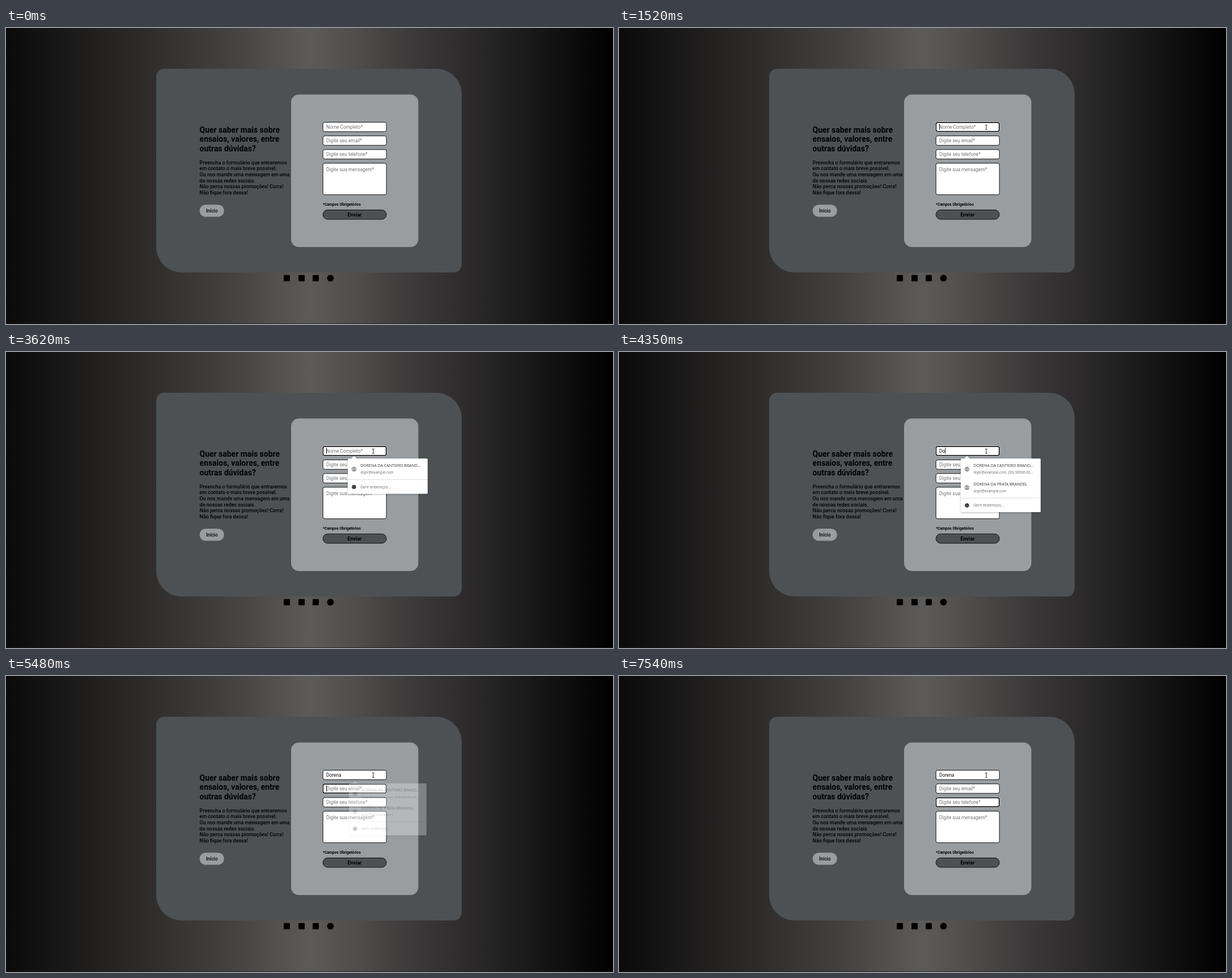
Animation of 1071 by 523 pixels, one loop 8000 ms. Source, as an HTML page:

```html
<!DOCTYPE html>
<html lang="pt">
<head>
<meta charset="utf-8">
<style>
  html, body { margin: 0; width: 100%; height: 100%; overflow: hidden; background: #000; }
  svg { display: block; width: 100vw; height: 100vh; font-family: Roboto, sans-serif; }
  h1 { margin: 0; }
  .heading { font-size: 13.95px; font-weight: 700; }
  .body { font-size: 8.93px; font-weight: 500; }
  .hint { font-size: 8.37px; fill: #757575; }
  .typed { font-size: 8.37px; fill: #111; }
  .field { fill: #fff; stroke: #111; stroke-width: 1; }
  .popup { font-family: "Open Sans", "Noto Sans", sans-serif; fill: #666; font-size: 6.2px; }
  .popup .name { font-size: 7px; fill: #333; }
  .popup .manage { font-size: 6.5px; }
</style>
</head>
<body>
<svg viewBox="0 0 1071 523" preserveAspectRatio="none">
  <defs>
    <linearGradient id="backdrop">
      <stop offset="0" stop-color="#0a0a0a"/>
      <stop offset=".23" stop-color="#2e2c2b"/>
      <stop offset=".38" stop-color="#464343"/>
      <stop offset=".43" stop-color="#504d4a"/>
      <stop offset=".5" stop-color="#5d5b57"/>
      <stop offset=".57" stop-color="#514e4c"/>
      <stop offset=".62" stop-color="#464343"/>
      <stop offset=".7" stop-color="#373435"/>
      <stop offset=".79" stop-color="#272626"/>
      <stop offset="1" stop-color="#000"/>
    </linearGradient>
    <filter id="shadow" x="-10%" y="-10%" width="120%" height="125%">
      <feDropShadow dx="0" dy="1" stdDeviation="1.5" flood-opacity=".3"/>
    </filter>
    <g id="person" fill="none" stroke="#444" stroke-width=".9">
      <circle r="3.6"/>
      <circle cy="-.9" r="1.2"/>
      <path d="M-2.4 2.5Q0 .3 2.4 2.5"/>
    </g>
  </defs>

  <rect width="1071" height="523" fill="url(#backdrop)"/>
  <rect y="522" width="1071" height="1" fill="#1c1416" opacity=".7"/>
  <path fill="#4d5153" d="M279 72H759A45 45 0 0 1 804 117V418A14 14 0 0 1 790 432H310A45 45 0 0 1 265 387V86A14 14 0 0 1 279 72Z"/>
  <rect x="503" y="117.5" width="224.5" height="269.5" rx="14" fill="#999da0"/>

  <g id="copy"></g>
  <rect id="home" x="341.7" y="312.2" width="43" height="21.4" rx="10.7"/>
  <text x="363.2" y="326" text-anchor="middle" font-size="8.4" font-weight="500">Início</text>

  <g id="fields"></g>
  <g id="focus" fill="none">
    <rect x="558.5" y="166" width="113.2" height="17.6" rx="3.5" stroke="#fff"/>
    <rect x="559.4" y="166.9" width="111.4" height="15.8" rx="2.7" stroke="#000" stroke-width="1.5"/>
  </g>
  <text id="typed" class="typed" x="565" y="177.6"></text>
  <rect id="caret" width=".9" height="10.6"/>

  <text x="559" y="314.2" font-size="6.69" font-weight="700">*Campos Obrigatórios</text>
  <rect x="559.2" y="321.4" width="112" height="16.6" rx="8.3" fill="#4d5153" stroke="#111"/>
  <text x="615" y="332.9" text-anchor="middle" font-size="8.93" font-weight="600">Enviar</text>

  <rect x="490" y="436.5" width="11" height="11" rx="1"/>
  <rect x="516" y="436.5" width="11" height="11" rx="1"/>
  <rect x="541" y="436.5" width="11" height="11" rx="1"/>
  <circle cx="572.5" cy="442" r="6"/>

  <g id="popup" class="popup">
    <g filter="url(#shadow)" fill="#fff">
      <rect id="sheet" x="603" y="188.3" width="141" rx="1.5"/>
      <path d="M609 188.5L614 184L619 188.5Z"/>
    </g>
    <use href="#person" x="614" y="207"/>
    <text class="name" x="625.4" y="203.4">DORENA DA CANTEIRO BRAND...</text>
    <text id="contact" x="625.4" y="215"></text>
    <g id="second">
      <use href="#person" x="614" y="239.5"/>
      <text class="name" x="625.4" y="235.9">DORENA DA PRATA BRANDEL</text>
      <text x="625.4" y="247.5">dopr@example.com</text>
    </g>
    <g id="footer">
      <path d="M603 225.5H744" stroke="#ddd"/>
      <circle cx="614" cy="238.5" r="3.8" fill="#444"/>
      <text class="manage" x="625.2" y="240.9">Gerir endereços...</text>
    </g>
  </g>

  <path id="arrow" d="M0 0V9.2L2.2 7.2L3.7 10.6L5.2 9.9L3.7 6.7H6.6Z" fill="#fff" stroke="#111" stroke-width=".8"/>
  <path id="beam" d="M-2 -4H-.6L0 -3.4L.6 -4H2M0 -3.4V3.4M-2 4H-.6L0 3.4L.6 4H2" fill="none" stroke="#111" stroke-width=".9"/>
</svg>
<script>
const LOOP = 8000;
const $ = id => document.getElementById(id);
const show = (id, visible) => $(id).setAttribute('visibility', visible ? 'visible' : 'hidden');
const clamp = v => Math.max(0, Math.min(1, v));

const textLines = (lines, cls, y, step) => lines.map((line, i) =>
  `<text class="${cls}" x="341.6" y="${y + i * step}">${line}</text>`).join('');

$('copy').innerHTML =
  textLines(['Quer saber mais sobre', 'ensaios, valores, entre', 'outras dúvidas?'], 'heading', 184.6, 16.74) +
  textLines(['Preencha o formulário que entraremos', 'em contato o mais breve possível.',
    'Ou nos mande uma mensagem em uma', 'de nossas redes sociais.',
    'Não perca nossas promoções! Corra!', 'Não fique fora dessa!'], 'body', 240.6, 10.7);

const FIELD_STEP = 24.15;
$('fields').innerHTML = ['Nome Completo*', 'Digite seu email*', 'Digite seu telefone*', 'Digite sua mensagem*']
  .map((hint, i) => {
    const y = 166.5 + i * FIELD_STEP, area = i === 3;
    return `<rect class="field" x="559.2" y="${y}" width="112" height="${area ? 55.7 : 16.6}" rx="3"/>` +
      `<text class="hint" x="565" y="${y + (area ? 14 : 11.1)}">${hint}</text>`;
  }).join('');
const nameHint = $('fields').querySelector('text');

// [time, x, y] of the mouse
const mousePath = [[70, 790, 490], [210, 555, 403], [350, 372, 322], [600, 368, 320], [690, 400, 300],
  [760, 500, 225], [830, 572, 174], [900, 590, 157], [1040, 618, 160], [1250, 648, 175.3]];
function mouseAt(t) {
  const next = mousePath.findIndex(p => p[0] > t);
  if (next < 0) return mousePath.at(-1).slice(1);
  const [t0, x0, y0] = mousePath[Math.max(0, next - 1)], [t1, x1, y1] = mousePath[next];
  const k = clamp((t - t0) / (t1 - t0 || 1));
  return [x0 + (x1 - x0) * k, y0 + (y1 - y0) * k];
}

const keyTimes = [4150, 4350, 4460, 4570, 4680, 4820];
const caretOn = [[1520, 2050], [2560, 3090], [3620, 5350], [5410, 5950], [6410, 6940], [7010, 7540]];
// [start, opacity, scale]
const popupSteps = [[0, 0, 1], [1590, .3, .97], [1650, .75, .99], [1720, 1, 1],
  [5410, .75, .99], [5480, .28, .97], [5550, 0, 1]];

function render(t) {
  const [mx, my] = mouseAt(t), overText = my > 166 && t > 900;
  show('arrow', t >= 70 && !overText);
  show('beam', overText);
  $(overText ? 'beam' : 'arrow').setAttribute('transform', `translate(${mx} ${my})`);

  const hover = clamp((t - 350) / 300) * (1 - clamp((t - 690) / 400));
  const mix = (from, to) => Math.round(from + (to - from) * hover);
  $('home').setAttribute('fill', `rgb(${mix(153, 77)},${mix(157, 81)},${mix(160, 83)})`);

  const typed = 'Dorena'.slice(0, keyTimes.filter(k => t >= k).length);
  $('typed').textContent = typed;
  nameHint.setAttribute('visibility', typed ? 'hidden' : 'visible');

  const focused = t < 5410 ? 0 : t < 7010 ? 1 : 2;
  show('focus', t >= 1520);
  $('focus').setAttribute('transform', `translate(0 ${focused * FIELD_STEP})`);
  show('caret', caretOn.some(([on, off]) => t >= on && t < off));
  const textWidth = focused === 0 && typed ? $('typed').getComputedTextLength() : 0;
  $('caret').setAttribute('x', 565.1 + textWidth);
  $('caret').setAttribute('y', 169.3 + focused * FIELD_STEP);

  const [, opacity, scale] = popupSteps.findLast(s => t >= s[0]);
  const tall = t >= keyTimes[0], extra = tall ? 32.5 : 0;
  const cy = 219.4 + extra / 2;
  $('popup').setAttribute('opacity', opacity);
  $('popup').setAttribute('transform', `translate(673.5 ${cy}) scale(${scale}) translate(-673.5 ${-cy})`);
  $('sheet').setAttribute('height', 62.2 + extra);
  $('second').setAttribute('display', tall ? 'inline' : 'none');
  $('footer').setAttribute('transform', `translate(0 ${extra})`);
  $('contact').textContent = 'dopr@example.com' + (tall ? ', (00) 90000-00...' : '');
}

const start = performance.now();
function tick() {
  render((performance.now() - start) % LOOP);
  requestAnimationFrame(tick);
}
tick();
</script>
</body>
</html>
```
